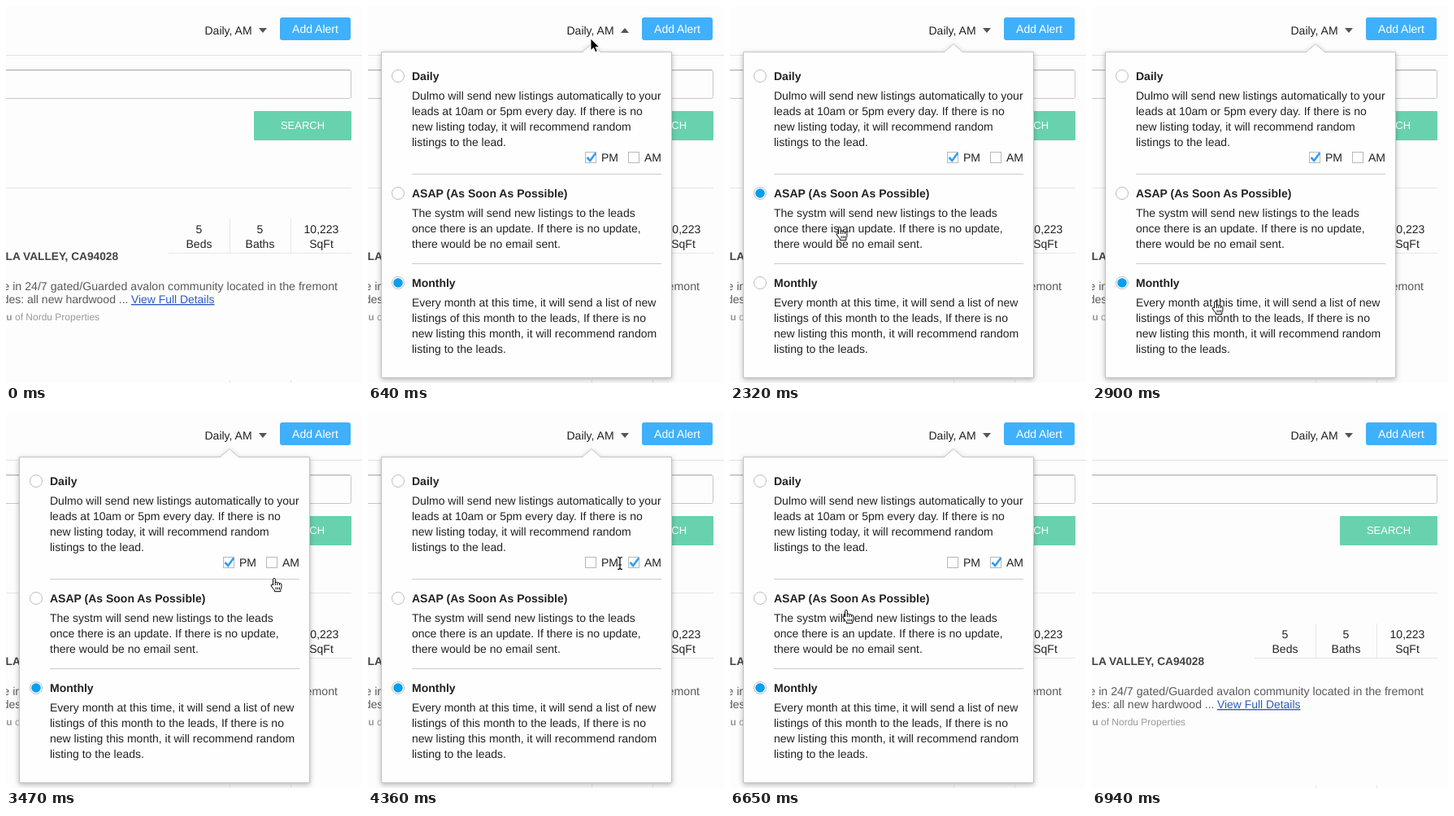
Recreate the animation shown at these times as an HTML page. Size 438 px wide and 463 px high, loop 7.15 s.

```html
<!DOCTYPE html>
<html lang="en">
<head>
<meta charset="utf-8">
<title>Alert frequency menu</title>
<style>
html, body { margin: 0; width: 100%; height: 100%; overflow: hidden; background: #fdfdfd; }
svg { display: block; }
text { font: 14px "Liberation Sans", Arial, sans-serif; fill: #222; white-space: pre; text-rendering: geometricPrecision; }
.bold { font-weight: bold; }
.mid { text-anchor: middle; }
.end { text-anchor: end; }
.white { fill: #fff; }
.body { fill: #5a5a5a; }
.small { font-size: 12px; fill: #999; }
.link { font-size: 13.9px; fill: #2a5cc0; text-decoration: underline; text-decoration-thickness: 1px; }
.line { stroke: #e6e6e6; fill: none; }
.rule { stroke: #ccc; fill: none; }
.box { fill: #fff; stroke: #b8b8b8; }
.tick { fill: none; stroke: #2f9ff0; stroke-width: 2.6; }
</style>
</head>
<body>
<svg width="438" height="463" viewBox="0 0 438 463">
  <defs>
    <filter id="shadow" x="-10%" y="-10%" width="120%" height="120%">
      <feDropShadow dx="0" dy="2" stdDeviation="3" flood-color="#000" flood-opacity=".28"/>
    </filter>
  </defs>
  <rect width="438" height="463" fill="#fdfdfd"/>

  <text x="244.5" y="35">Daily, AM</text>
  <path id="caret" fill="#555"/>
  <rect x="337" y="14" width="87" height="28" rx="3" fill="#3fb0fc"/>
  <text class="mid white" x="380.5" y="33">Add Alert</text>
  <path d="M0 60.5H438" stroke="#e2e2e2"/>

  <rect x="-8.5" y="78.5" width="433" height="35" rx="2" fill="#fdfdfd" stroke="#c8c8c8"/>
  <path d="M0 78.5H423" stroke="#b4b4b4"/>
  <path d="M0 79.5H424" stroke="#e4e4e4"/>
  <rect x="305" y="129" width="120" height="36" rx="1" fill="#68d2ae"/>
  <text class="mid white" x="365" y="151" style="font-size:13px">SEARCH</text>
  <path class="line" d="M0 223.5H425M200 303.5H425M275.5 261V303M350.5 261V303M275.5 459V463M350.5 459V463"/>

  <g class="mid">
    <text x="237.5" y="279">5</text><text x="237.5" y="297">Beds</text>
    <text x="312.5" y="279">5</text><text x="312.5" y="297">Baths</text>
    <text x="388" y="279">10,223</text><text x="388" y="297">SqFt</text>
  </g>
  <text class="bold end" x="138" y="312" style="font-size:13.7px;fill:#444">LA VALLEY, CA94028</text>
  <text class="body end" x="408" y="349" style="font-size:14.2px">e in 24/7 gated/Guarded avalon community located in the fremont</text>
  <text class="body end" x="150.5" y="365">des: all new hardwood ...</text>
  <text class="link" x="154" y="365">View Full Details</text>
  <text class="small bold end" x="7.5" y="386">du</text>
  <text class="small" x="11" y="386">of Nordu Properties</text>

  <g id="panel">
    <path d="M16.5 56.5H264L275 46.5L286 56.5H373.5V456.5H16.5Z" fill="#fefefe" stroke="#c4c4c4" filter="url(#shadow)"/>
    <path class="rule" d="M54 206.5H361M54 316.5H361"/>
    <g id="options"></g>
    <rect class="box" x="267.5" y="179.5" width="13" height="13"/>
    <rect class="box" x="320.5" y="179.5" width="13" height="13"/>
    <path class="tick" id="pm" d="M269.5 186l3.7 4 7-9.5"/>
    <path class="tick" id="am" d="M322.5 186l3.7 4 7-9.5"/>
    <text x="287" y="191">PM</text>
    <text x="340" y="191">AM</text>
  </g>

  <g id="cursor">
    <path id="arrow" d="M0 0V14.5L3.4 11.4L5.8 16.6L8.3 15.5L6 10.4H10.6Z" fill="#000" stroke="#fff" stroke-width=".9"/>
    <path id="hand" d="M-1.4 9V1.6Q-1.3 .4 -.1 .4T1.3 1.6V6Q1.5 5 2.6 5.1T3.9 6.3Q4.3 5.5 5.3 5.7T6.5 7Q7 6.3 7.9 6.6T8.9 8V11.5Q8.8 13.5 7.8 14.6V16.7H.4V15Q-1.4 13.3 -3.6 10Q-4.3 8.6 -3.2 8T-1.4 9ZM1.3 6V9M3.9 6.5V9M6.5 7V9M2.1 11.5V14.3M4.3 11.5V14.3M6.5 11.5V14.3" fill="#fff" stroke="#000"/>
    <g id="beam" fill="none">
      <path d="M-3 -7.5Q0 -7.5 0 -5.5Q0 -7.5 3 -7.5M0 -6V6M-3 7.5Q0 7.5 0 5.5Q0 7.5 3 7.5M-2 2H2" stroke="#fff" stroke-width="2.6"/>
      <path d="M-3 -7.5Q0 -7.5 0 -5.5Q0 -7.5 3 -7.5M0 -6V6M-3 7.5Q0 7.5 0 5.5Q0 7.5 3 7.5M-2 2H2" stroke="#000" stroke-width="1.2"/>
    </g>
  </g>
</svg>
<script>
const LOOP = 7150;
const $ = id => document.getElementById(id);

const options = [
  [86, 'Daily', 'Dulmo will send new listings automatically to your',
    'leads at 10am or 5pm every day. If there is no',
    'new listing today, it will recommend random', 'listings to the lead.'],
  [230, 'ASAP (As Soon As Possible)', 'The systm will send new listings to the leads',
    'once there is an update. If there is no update,', 'there would be no email sent.'],
  [340, 'Monthly', 'Every month at this time, it will send a list of new',
    'listings of this month to the leads, If there is no',
    'new listing this month, it will recommend random', 'listing to the leads.']
];

$('options').innerHTML = options.map(([y, title, ...lines]) =>
  `<circle cx="37" cy="${y}" r="7.5" fill="#fff" stroke="#b9bec2"/>
   <circle class="dot" cx="37" cy="${y}" r="5.8" fill="#069fee"/>
   <text class="bold" x="54" y="${y + 5}">${title}</text>` +
  lines.map((line, i) => `<text x="54" y="${y + 29 + i * 19}">${line}</text>`).join('')
).join('');
const dots = document.querySelectorAll('.dot');

// Each move: start, end, steps, from, bend, to, shape at a given progress.
const moves = [
  [290, 640, 7, [445, 130], [350, 75], [274, 40], () => 'arrow'],
  [990, 1330, 7, [274, 40], [225, 85], [167, 120], p => p < .3 ? 'arrow' : 'hand'],
  [1690, 1980, 6, [167, 120], [162, 184], [134, 260], () => 'hand'],
  [2220, 2720, 10, [134, 260], [138, 315], [152, 362], () => 'hand'],
  [2960, 3530, 11, [152, 362], [255, 275], [346, 190], p => p < 1 ? 'hand' : 'beam'],
  [3830, 3830, 1, [343, 186], [343, 186], [343, 186], () => 'arrow'],
  [4010, 4710, 12, [343, 186], [301.5, 186], [294, 191], p => p < .45 ? 'arrow' : 'beam'],
  [5060, 5350, 6, [294, 191], [310, 188], [325, 184], p => p < .4 ? 'beam' : 'arrow'],
  [6360, 6940, 11, [325, 184], [180, 230], [-20, 300], p => p < .1 ? 'arrow' : 'hand']
];

const between = (t, a, b) => t >= a && t < b;
const show = (el, on) => { el.style.display = on ? '' : 'none'; };

function progress(t, start, end, steps) {
  if (t >= end) return 1;
  const step = Math.floor((t - start) / (end - start) * (steps - 1) + 1e-6);
  const p = (step + 1) / steps;
  return p * p * (3 - 2 * p);
}

function drawCursor(t) {
  const move = moves.filter(m => t >= m[0]).pop();
  show($('cursor'), move && t < 6940);
  if (!move) return;
  const [start, end, steps, from, bend, to, shapeAt] = move;
  const p = progress(t, start, end, steps), q = 1 - p;
  const [x, y] = from.map((v, i) => Math.round(q * q * v + 2 * p * q * bend[i] + p * p * to[i]));
  $('cursor').setAttribute('transform', `translate(${x} ${y})`);
  for (const shape of ['arrow', 'hand', 'beam']) show($(shape), shape === shapeAt(p));
}

function draw(t) {
  show($('panel'), between(t, 580, 6830));
  $('caret').setAttribute('d', between(t, 580, 1100) ? 'M311 33L316 27L321 33Z' : 'M311 27H321L316 33Z');
  const selected = between(t, 1510, 2160) ? 0 : between(t, 2160, 2900) ? 1 : 2;
  dots.forEach((dot, i) => show(dot, i === selected));
  const am = between(t, 4010, 4880) || t >= 5700;
  show($('am'), am);
  show($('pm'), !am);
  drawCursor(t);
}

const began = performance.now();
function tick() {
  draw((performance.now() - began) % LOOP);
  requestAnimationFrame(tick);
}
draw(0);
requestAnimationFrame(tick);
</script>
</body>
</html>
```
